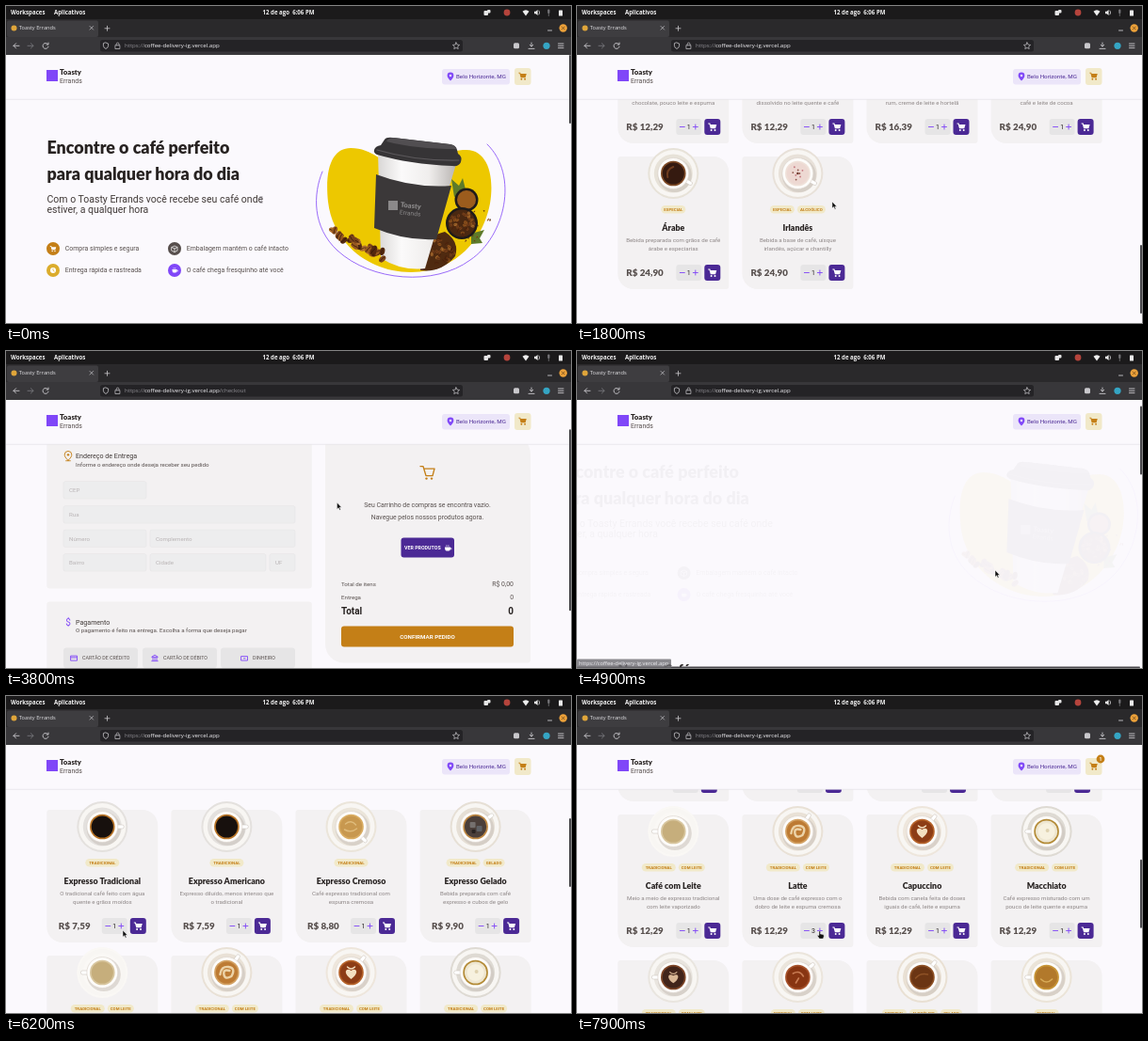
Write an HTML page that moves like this. It is 600x337 px and loops after 8 s.

```html
<!DOCTYPE html>
<html lang="pt-BR">
<head>
<meta charset="utf-8">
<title>Toasty Errands</title>
<style>
html, body { margin: 0; width: 100%; height: 100%; overflow: hidden; background: #fbf9fd; }
svg { display: block; width: 600px; height: 337px; }
text { font-family: Roboto, "Liberation Sans", sans-serif; white-space: pre; }
.h { font-family: Lato, "Open Sans", sans-serif; font-weight: 900; }
.u { font-family: "Open Sans", "Noto Sans", sans-serif; }
.b { font-weight: 700; }
.m { text-anchor: middle; }
.e { text-anchor: end; }
</style>
</head>
<body>
<svg id="stage" viewBox="0 0 600 337"></svg>
<script>
const LOOP = 8000, STEP = 100;
const INK = '#272221', TEXT = '#574f4d', SOFT = '#8d8686', CARD = '#f3f1f2', BTN = '#e6e5e6';
const PURPLE = '#8047f8', DEEP = '#4b2995', AMBER = '#c47f17', GOLD = '#dbac2c', SAND = '#f1e9c9';
const SITE = 'coffee-delivery-ig.vercel.app';

// y is the vertical middle of the capitals
const text = (x, y, s, size, fill, cls = '', more = '') =>
  `<text x="${x}" y="${y + size * .355}" font-size="${size}" fill="${fill}" class="${cls}" ${more}>${s}</text>`;
const rect = (x, y, w, h, fill, r = 0, more = '') =>
  `<rect x="${x}" y="${y}" width="${w}" height="${h}" rx="${r}" fill="${fill}" ${more}/>`;
const disc = (x, y, r, fill, more = '') => `<circle cx="${x}" cy="${y}" r="${r}" fill="${fill}" ${more}/>`;
const path = (d, fill, more = '') => `<path d="${d}" fill="${fill}" ${more}/>`;
const line = (d, color, w = 1, more = '') =>
  path(d, 'none', `stroke="${color}" stroke-width="${w}" stroke-linecap="round" stroke-linejoin="round" ${more}`);
const at = (x, y, body, s = 1) => `<g transform="translate(${x} ${y}) scale(${s})">${body}</g>`;

const cart = (x, y, s, c) => at(x, y,
  path('M-5-4.5h2.2l.6 1.7H5L3.6 2H-2.2L-3.7-3.4H-5z', c) + disc(-1.3, 3.8, 1.1, c) + disc(3, 3.8, 1.1, c), s);
const mug = (x, y, s, c) => at(x, y,
  path('M-4-1.5H4Q4 3.5 1.5 4H-1.5Q-4 3.5-4-1.5z', c) + line('M-1.5-4v1.2M1.2-4v1.2M4 0h1.3v1.6H3.5', c, .9), s);
const PIN = 'M0 5C-2.5 2.4-4 .6-4-1.4A4 4 0 0 1 4-1.4C4 .6 2.5 2.4 0 5z';

// diagonal corners: two tight, two wide
const leaf = (x, y, w, h, r = 16.5, q = 3) => path(
  `M${x + q} ${y}H${x + w - r}a${r} ${r} 0 0 1 ${r} ${r}V${y + h - q}a${q} ${q} 0 0 1-${q} ${q}H${x + r}a${r} ${r} 0 0 1-${r}-${r}V${y + q}a${q} ${q} 0 0 1 ${q}-${q}z`, CARD);

function random(seed) {
  return () => (seed = (seed * 16807) % 2147483647) / 2147483647;
}
function beans(n, seed, place, size) {
  const rnd = random(seed);
  let out = '';
  for (let i = 0; i < n; i++) {
    const [x, y] = place(rnd);
    const tone = ['#7a421b', '#95561f', '#55290f', '#b0702f'][Math.floor(rnd() * 4)];
    out += `<g transform="translate(${x.toFixed(1)} ${y.toFixed(1)}) rotate(${Math.floor(rnd() * 180)})">` +
      `<ellipse rx="${size}" ry="${size * .66}" fill="${tone}"/>` +
      line(`M${-size * .8} 0Q0 .8 ${size * .8} 0`, '#2c1408', size * .16) + '</g>';
  }
  return out;
}
const inDisc = (x, y, r) => rnd => {
  const a = rnd() * 6.283, d = Math.sqrt(rnd()) * r;
  return [x + Math.cos(a) * d, y + Math.sin(a) * d];
};

// ---- products: name, two lines, price, tags, cup style
const T = 'TRADICIONAL', G = 'GELADO', L = 'COM LEITE', S = 'ESPECIAL', A = 'ALCOÓLICO';
const products = [
  ['Expresso Tradicional', 'O tradicional café feito com água', 'quente e grãos moídos', '7,59', [T], 'black'],
  ['Expresso Americano', 'Expresso diluído, menos intenso que', 'o tradicional', '7,59', [T], 'black'],
  ['Expresso Cremoso', 'Café expresso tradicional com', 'espuma cremosa', '8,80', [T], 'cream'],
  ['Expresso Gelado', 'Bebida preparada com café', 'expresso e cubos de gelo', '9,90', [T, G], 'ice'],
  ['Café com Leite', 'Meio a meio de expresso tradicional', 'com leite vaporizado', '12,29', [T, L], 'milk'],
  ['Latte', 'Uma dose de café expresso com o', 'dobro de leite e espuma cremosa', '12,29', [T, L], 'latte'],
  ['Capuccino', 'Bebida com canela feita de doses', 'iguais de café, leite e espuma', '12,29', [T, L], 'heart'],
  ['Macchiato', 'Café expresso misturado com um', 'pouco de leite quente e espuma', '12,29', [T, L], 'foam'],
  ['Mocaccino', 'Café expresso com calda de', 'chocolate, pouco leite e espuma', '12,29', [T, L], 'mocha'],
  ['Chocolate Quente', 'Bebida feita com chocolate', 'dissolvido no leite quente e café', '12,29', [S, L], 'cocoa'],
  ['Cubano', 'Drink gelado de café expresso com', 'rum, creme de leite e hortelã', '16,39', [S, A, G], 'rum'],
  ['Havaiano', 'Bebida adocicada preparada com', 'café e leite de cocoa', '24,90', [S], 'coco'],
  ['Árabe', 'Bebida preparada com grãos de café', 'árabe e especiarias', '24,90', [S], 'arab'],
  ['Irlandês', 'Bebida a base de café, uísque', 'irlandês, açúcar e chantilly', '24,90', [S, A], 'irish']
];
// rim, coffee, saucer, handle angle
const cups = {
  black: ['#b87427', '#17100d', '#e4e1de', 0], cream: ['#d9ac62', '#c8984f', '#ebe5da', 45],
  ice: ['#bd8743', '#4b3f3a', '#e6dfd5', -35], milk: ['#d8c69f', '#c6ae7c', '#faf8f5', 180],
  latte: ['#d2a062', '#bd7b34', '#e9e1d6', -55], heart: ['#b5622a', '#8d3d16', '#eee6dc', -50],
  foam: ['#b38a36', '#eee6d0', '#dedad3', 180], mocha: ['#7d4426', '#41241a', '#e9e5df', 180],
  cocoa: ['#a6512a', '#883512', '#ebe5dc', -40], rum: ['#8c4f23', '#6b3513', '#e9e0d3', -50],
  coco: ['#c79436', '#b2792b', '#ebe4d8', 180], arab: ['#7e4a26', '#351a10', '#e7e2d8', 30],
  irish: ['#efe0d8', '#edd8d2', '#e8e1d9', 30]
};
const petals = (c, s) => at(0, 0, path('M0 7C-9 1-6-6 0-2C6-6 9 1 0 7z', c) + line('M-4-6Q0-2 4-6M0-1V5', c, 1.4), s);
const sprinkle = i => {
  const d = 2 + i * .8;
  return disc(Math.cos(i * 2.4) * d, Math.sin(i * 2.4) * d, .9, i % 2 ? '#c5787f' : '#8d5549');
};
const art = {
  cream: line('M-6-3q6-5 11 1M-7 3q7 4 13-1', '#dfbb7b', 1.5),
  ice: rect(-6, -5, 6, 6, '#75706e', 1) + rect(1, -1, 6, 6, '#5f6165', 1) + rect(-4, 3, 4, 4, '#2a2321', 1),
  latte: line('M-7 2Q-6-7 2-6T5 4Q-2 8-3 2T3-2', '#ecd3a8', 2.4),
  heart: petals('#f3dfc0', 1), mocha: petals('#d9b795', .9),
  foam: disc(0, 0, 9, '#f7f1df') + disc(1, -1, 2, '#dfd2b0'),
  cocoa: line('M-5-4Q2-8 6-1M-2 6L1 1', '#c97d55', 1.6), rum: line('M-7 1Q-2-5 6-3', '#8f5226', 1.5),
  coco: line('M-6 2Q0 8 6 2', '#d8ab58', 1.6), arab: line('M-6 4Q-8-4 0-7', '#6f3c1f', 2),
  irish: [0, 1, 2, 3, 4, 5, 6, 7].map(sprinkle).join('') + disc(0, 0, 1.2, '#6b3327')
};
function cup(kind, x, y) {
  const [rim, coffee, saucer, turn] = cups[kind];
  return at(x, y,
    disc(0, 0, 27, saucer) + disc(0, 0, 25, '#f8f6f3') + disc(0, 0, 20.5, saucer) + disc(1.5, 2, 18, '#c9c2bb', 'opacity=".55"') +
    `<g transform="rotate(${turn})">${rect(12, -2, 11, 4, '#fff', 2, 'stroke="#cfc8c1" stroke-width=".6"')}</g>` +
    disc(0, 0, 16.5, '#fdfcfa', 'stroke="#d8d1ca" stroke-width=".6"') + disc(0, 0, 13.3, rim) + disc(0, 0, 11.6, coffee) + (art[kind] || ''));
}

const tagWidth = { [T]: 36, [L]: 28, [S]: 26, [A]: 30, [G]: 23 };
function card([name, a, b, price, tags, kind], i) {
  const x = 43.3 + 132.1 * (i % 4), y = 389 + 155 * Math.floor(i / 4), mid = x + 59;
  let out = leaf(x, y, 118, 141) + cup(kind, mid, y + 18);
  let tx = mid - (tags.reduce((sum, s) => sum + tagWidth[s] + 3, -3)) / 2;
  for (const s of tags) {
    out += rect(tx, y + 52, tagWidth[s], 8.6, SAND, 4.3) + text(tx + tagWidth[s] / 2, y + 56.4, s, 4.4, AMBER, 'b m');
    tx += tagWidth[s] + 3;
  }
  out += text(mid, y + 75.5, name, 8.85, INK, 'h m') + text(mid, y + 89, a, 6.15, SOFT, 'm') + text(mid, y + 98, b, 6.15, SOFT, 'm');
  const pw = price.length > 4 ? 40 : 33, left = mid - (pw + 60) / 2, box = left + pw + 13, row = y + 123.5;
  return out + text(left, row, 'R$ ' + price, 9.8, TEXT, 'h') + rect(box, row - 8.5, 27, 17, BTN, 3) +
    line(`M${box + 4} ${row}h5M${box + 18} ${row}h5m-2.5-2.5v5`, PURPLE, .9) +
    text(box + 13.5, row, 1, 7, INK, 'm', `id="count${i}"`) +
    rect(box + 30, row - 8.5, 17, 17, DEEP, 3) + cart(box + 38.5, row, .9, '#fff');
}

// ---- home
const features = [
  [50, 258, AMBER, 'Compra simples e segura', cart(50, 258, .65, '#fff')],
  [179, 258, TEXT, 'Embalagem mantém o café intacto', line('M176 256.5l3-1.5 3 1.5v3.6l-3 1.6-3-1.6zl3 1.5 3-1.5M179 258v3.5', '#fff', .7)],
  [50, 281, GOLD, 'Entrega rápida e rastreada', disc(50, 281, 3, '#fff') + line('M50 279.2v2l1.2.8', GOLD, .7)],
  [179, 281, PURPLE, 'O café chega fresquinho até você', mug(179, 281, .65, '#fff')]
];
const heroText =
  text(43.5, 150.5, 'Encontre o café perfeito', 17.9, INK, 'h') + text(43.5, 178.5, 'para qualquer hora do dia', 17.9, INK, 'h') +
  text(43.5, 205, 'Com o Toasty Errands você recebe seu café onde', 10.5, '#403937') +
  text(43.5, 216.5, 'estiver, a qualquer hora', 10.5, '#403937') +
  features.map(([x, y, c, s, icon]) => disc(x, y, 7, c) + icon + text(x + 12.8, y, s, 6.95, TEXT)).join('');

const scoop = (x, y, r, fill) => disc(x, y, r, '#1f1b1a') + disc(x, y, r - 2.5, fill);
const scatter = rnd => { const u = rnd(); return [347 + u * 53, 237 + u * 24 + rnd() * 8]; };
const heroArt =
  path('M342 208C338 170 348 151 366 151C392 151 400 172 424 168C450 164 468 153 489 153C511 153 519 180 514 210C506 252 474 283 430 283C385 283 347 252 342 208z', '#edc800') +
  line('M336 176C326 200 325 235 352 260C388 293 455 298 493 270C530 245 545 180 511 147', PURPLE, .8) +
  path('M476 203l-3-19 8 7 4-8 4 16zM494 242l14-4-5 9 3 5-12 1z', '#5d7a2a') +
  beans(30, 21, inDisc(493, 228, 24), .9) +
  path('M440 275Q444 244 466 240Q482 250 477 266Q462 284 440 281z', '#4f2a10') + beans(36, 77, inDisc(462, 260, 14), 2.2) +
  scoop(489, 206, 12.5, '#9c5c1d') + scoop(484, 231, 17, '#4a2811') + beans(34, 53, inDisc(484, 231, 13), 2.2) +
  path('M395 155L398 268Q420 282 445 279L478 168z', 'url(#paper)') +
  path('M393 179Q432 194 473 191L457 248Q424 250 391 236z', '#3b3839') +
  rect(406, 207, 10, 10, '#8b898a') + text(419, 211, 'Toasty', 7.4, '#8b898a', 'h', 'transform="rotate(6 419 211)"') +
  text(418, 219, 'Errands', 6.6, '#8b898a', '', 'transform="rotate(6 418 219)"') +
  beans(30, 9, scatter, 4.2) +
  path('M391 153Q392 149 398 148L402 142Q404 139 411 140L472 147Q478 148 479 153L480 157Q485 160 483 166Q481 171 474 170Q428 168 394 158Q390 156 391 153z', '#363436') +
  path('M404 144Q435 152 478 152Q477 148 471 147L412 140Q406 140 404 144z', '#514e51') + line('M394 153Q435 165 481 164', '#5b585b', 1.2);

const home = `<g id="home"><g id="heroText">${heroText}</g><g id="heroArt">${heroArt}</g>` +
  text(43.5, 360.5, 'Nossos Cafés', 13.8, INK, 'h') + products.map(card).join('') + '</g>';

// ---- checkout
const field = (x, y, w, s) =>
  rect(x, y, w, 18.5, '#ededee', 2, `stroke="${BTN}" stroke-width=".6"`) + text(x + 6, y + 9.3, s, 6.15, '#b9b4b5');
const pay = (x, tx, s, icon) => rect(x, 362, 79, 21.5, BTN, 3) + line(icon, PURPLE, .9) + text(tx, 373, s, 5.3, TEXT);
const sum = (y, label, value, size, cls = '') =>
  text(356, y, label, size, cls ? INK : TEXT, cls) + text(539, y, value, cls ? size : 6.9, cls ? INK : TEXT, cls + ' e');
const checkout = '<g id="checkout">' +
  text(43.5, 125, 'Complete seu pedido', 8, INK, 'h') + text(339, 125, 'Cafés selecionados', 8, INK, 'h') +
  rect(43.3, 136, 281.5, 163, CARD, 3) + at(66, 158, line(PIN, AMBER, 1) + line('M-2.5 5.4h5', AMBER, .9) + disc(0, -1.3, 1.3, AMBER), .95) +
  text(74, 158, 'Endereço de Entrega', 7.1, '#403937') + text(74, 166.8, 'Informe o endereço onde deseja receber seu pedido', 6.15, TEXT) +
  field(61, 185, 88, 'CEP') + field(61, 211, 246, 'Rua') + field(61, 236.5, 88, 'Número') + field(153, 236.5, 154, 'Complemento') +
  field(61, 262, 88, 'Bairro') + field(153, 262, 123, 'Cidade') + field(280, 262, 27, 'UF') +
  rect(43.3, 313, 281.5, 88, CARD, 3) + text(66, 335, '$', 10, PURPLE, 'm') +
  text(74, 335, 'Pagamento', 7.1, '#403937') + text(74, 343.6, 'O pagamento é feito na entrega. Escolha a forma que deseja pagar', 6.15, TEXT) +
  pay(61, 81, 'CARTÃO DE CRÉDITO', 'M69 370.5h6.5v5H69zM69 372.3h6.5') +
  pay(145, 167, 'CARTÃO DE DÉBITO', 'M155 371.5l3-2 3 2zM156 372v3M158 372v3M160 372v3M154.8 376h6.4') +
  pay(228, 262, 'DINHEIRO', 'M250 371h6.5v4.4H250zM252.5 373.2h1.5') +
  leaf(339, 136, 218, 242, 20) +
  line('M440 169h3l3 10h7l2-7.5h-11', AMBER, 1.4) + disc(446.5, 182, 1.2, AMBER) + disc(452, 182, 1.2, AMBER) +
  text(447.5, 210, 'Seu Carrinho de compras se encontra vazio.', 6.9, TEXT, 'm') +
  text(447.5, 222.5, 'Navegue pelos nossos produtos agora.', 6.9, TEXT, 'm') +
  rect(419.5, 245, 56.5, 21, DEEP, 3) + text(423, 256, 'VER PRODUTOS', 5.3, '#fff', 'b') + mug(469, 256, .75, '#fff') +
  sum(294, 'Total de itens', 'R$ 0,00', 6.15) + sum(308, 'Entrega', '0', 6.15) + sum(323, 'Total', '0', 10, 'b') +
  rect(356, 339, 183, 22, AMBER, 3) + text(447.5, 350, 'CONFIRMAR PEDIDO', 6.2, '#fff', 'b m') + '</g>';

// ---- fixed header and browser
const header = rect(0, 51, 600, 48, '#fbf9fd') + rect(0, 98.8, 600, .8, '#e7e5e9') +
  rect(43, 68, 12, 12, PURPLE) + text(57, 70, 'Toasty', 7.8, INK, 'h') + text(57, 79.3, 'Errands', 7, TEXT) +
  rect(463, 67, 72, 16.5, '#ebe5f9', 3) + at(472, 75.2, path(PIN, PURPLE) + disc(0, -1.3, 1.5, '#ebe5f9'), .85) +
  text(478, 75.2, 'Belo Horizonte, MG', 6.2, DEEP) +
  rect(540, 66, 17.5, 18, SAND, 3) + cart(548.5, 74.5, .85, AMBER) +
  `<g id="badge">${disc(556, 67, 4.4, AMBER)}${text(556, 67, 1, 5, '#fff', 'b m')}</g>`;

const GREY = '#c9c8cc';
const browser = rect(0, 0, 600, 14, '#1b1a1b') + rect(0, 14, 600, 19, '#2a292b') + rect(0, 33, 600, 19, '#38373a') +
  text(5, 7, 'Workspaces', 6.1, '#f2f2f2', 'u b') + text(51, 7, 'Aplicativos', 6.1, '#f2f2f2', 'u b') +
  text(300, 7, '12 de ago  6:06 PM', 6.1, '#f2f2f2', 'u b m') +
  rect(507.5, 5, 4.5, 5, '#e5e5e5', 1) + rect(511, 4, 3.5, 3.5, '#e5e5e5', 1) + disc(532, 7, 3.4, '#b5443c') +
  path('M548.5 5.8Q552 2.8 555.5 5.8L552 10.5z', '#eee') +
  path('M561 5.7h1.6l2-1.7v6l-2-1.7H561z', '#eee') + line('M566 5q1.6 2 0 4', '#eee', .7) +
  rect(575.2, 3.5, 2.2, 4.5, '#77767a', 1.1) + line('M576.3 8v2.5', '#77767a', .8) + rect(587, 4.5, 4, 6, '#eee', .6) +
  rect(1, 15.5, 97, 17.5, '#3e3d40', 2) + disc(8.5, 23.5, 3, '#e0a63a') + text(13.8, 23.3, 'Toasty Errands', 5.7, '#e4e3e6', 'u') +
  line('M89 21.5l3.6 3.6m0-3.6L89 25.1', GREY, .7) + line('M105 23.8h5M107.5 21.3v5', GREY, .8) +
  line('M575.5 26h4', GREY, .9) + disc(591.7, 23.5, 4.2, '#eea23a') + line('M590.2 22l3 3m0-3l-3 3', '#6d4a1c', .8) +
  line('M14 42.3H8m2.6-2.6L8 42.3l2.6 2.6', GREY, .9) + line('M23 42.3h6m-2.6-2.6 2.6 2.6-2.6 2.6', '#77767b', .9) +
  line('M44.5 40.6a3 3 0 1 0 .5 2.6M45 39v2h-2', GREY, .9) +
  rect(100, 36, 385, 12.5, '#242326', 2.5) +
  line('M106 39l2.6 1v2.5q-.4 2-2.6 3-2.2-1-2.6-3V40z', GREY, .8) + line('M116.3 41.7h4.6v3.8h-4.6zM117.2 41.5v-1a1.4 1.4 0 0 1 2.8 0v1', GREY, .7) +
  `<text class="u" x="126" y="44.4" font-size="6.14" fill="#8f8e93">https://<tspan fill="#f1f0f4">${SITE}</tspan><tspan id="route">/checkout</tspan></text>` +
  line('M478 38.8l1.1 2.3 2.5.3-1.9 1.7.5 2.5-2.2-1.2-2.2 1.2.5-2.5-1.9-1.7 2.5-.3z', GREY, .7) +
  rect(539, 39.3, 6, 6, GREY, 1.5) + line('M558 39v4m-1.8-1.7L558 43l1.8-1.7M555 45.4h6', GREY, .9) +
  disc(574, 42.3, 3.6, '#35a5c4') + line('M586.5 40h5.5M586.5 42.3h5.5M586.5 44.6h5.5', GREY, .9);

const overlay = rect(598, 0, 2, 73, '#4a494d', 1, 'id="thumb"') + rect(0, 335.5, 598, 1.5, '#4a494d', .7, 'id="sideThumb"') +
  `<g id="status">${rect(0, 327.5, 100, 9.5, '#6f6e73', 1, 'id="statusBox"')}${text(2, 332, '', 5.8, '#ececf0', 'u', 'id="statusText"')}</g>` +
  `<g id="cursor"><g id="arrow">${path('M0 0V7.2L1.7 5.7 2.9 8.3 4 7.8 2.9 5.3H5z', '#111', 'stroke="#fff" stroke-width=".5"')}</g>` +
  `<g id="hand">${path('M0 0q1-.6 1.4.5V3L4.2 3.6q1.2.4 1 1.8L4.4 8H.4L-1.6 5Q-1.8 3.8 0 4.6z', '#111', 'stroke="#fff" stroke-width=".4"')}</g>` +
  `<g id="beam">${line('M-1.2 0h2.4M0 0v6M-1.2 6h2.4', '#77747a', .7)}</g></g>`;

document.getElementById('stage').innerHTML =
  '<defs><linearGradient id="paper"><stop stop-color="#d9d7d6"/><stop offset=".3" stop-color="#fbfafa"/><stop offset=".65" stop-color="#f0eeed"/><stop offset="1" stop-color="#b9b5b3"/></linearGradient></defs>' +
  rect(0, 0, 600, 337, '#fbf9fd') + home + checkout + header + browser + overlay;

// ---- motion
const scrollHome = [[0, 0], [800, 319], [1700, 694], [4799, 694], [4800, 22], [5400, 22], [6100, 268], [6800, 268], [7200, 418]];
const scrollCheckout = [[2800, 121], [3200, 53], [3700, 53], [4200, 20]];
const pointer = [[0, 271, 203], [100, 270, 206], [1900, 271, 208], [2300, 548, 73], [2700, 548, 73], [3200, 336, 149], [3700, 336, 149],
  [4400, 444, 233], [5300, 444, 233], [6100, 124, 249], [6500, 124, 249], [6600, 140, 245], [6800, 140, 245], [7200, 257, 250]];

function track(keys, t) {
  if (t <= keys[0][0]) return keys[0].slice(1);
  const i = keys.findIndex(k => k[0] > t);
  if (i < 0) return keys[keys.length - 1].slice(1);
  const a = keys[i - 1], b = keys[i], p = (t - a[0]) / (b[0] - a[0]);
  return a.slice(1).map((v, k) => v + (b[k + 1] - v) * p);
}
const within = (t, a, b) => t >= a && t < b;
const el = {};
document.querySelectorAll('[id]').forEach(n => el[n.id] = n);
const show = (n, on) => n.setAttribute('visibility', on ? 'visible' : 'hidden');
const move = (n, x, y) => n.setAttribute('transform', `translate(${x} ${y})`);

function draw(t) {
  const paying = within(t, 2400, 4800);
  const [scroll] = track(paying ? scrollCheckout : scrollHome, t);
  show(el.home, !paying);
  show(el.checkout, paying);
  move(paying ? el.checkout : el.home, 0, -scroll);
  el.route.textContent = paying ? '/checkout' : '';
  el.thumb.setAttribute('y', 52 + scroll / (paying ? 1.48 : 3.435));
  el.thumb.setAttribute('height', paying ? 193 : 73);

  // the hero halves slide in from both sides when the home page opens again
  const p = t < 4800 ? 1 : Math.min(1, Math.max(0, (t - 4880) / 600));
  const shift = 70 * (1 - p) ** 2;
  move(el.heroText, -shift, 0);
  move(el.heroArt, shift, 0);
  el.heroText.setAttribute('opacity', p);
  el.heroArt.setAttribute('opacity', p);
  show(el.sideThumb, p < 1);

  el.count0.textContent = t >= 6400 ? 2 : 1;
  el.count5.textContent = t >= 7800 ? 3 : t >= 7500 ? 2 : 1;
  show(el.badge, t >= 6700);

  const toCart = within(t, 2300, 2600);
  show(el.status, toCart || within(t, 4400, 5000));
  el.status.setAttribute('opacity', t >= 4900 ? .8 : 1);
  el.statusText.textContent = 'https://' + SITE + (toCart ? '/checkout' : '');
  el.statusBox.setAttribute('width', toCart ? 128 : 100);

  move(el.cursor, ...track(pointer, t));
  const beam = t < 100;
  const hand = toCart || within(t, 4400, 4800) || within(t, 6600, 6900) || t >= 7200;
  show(el.beam, beam);
  show(el.hand, hand);
  show(el.arrow, !beam && !hand);
}

const start = performance.now();
function tick() {
  const t = (performance.now() - start) % LOOP;
  draw(Math.floor(t / STEP) * STEP);
  requestAnimationFrame(tick);
}
tick();
</script>
</body>
</html>
```
